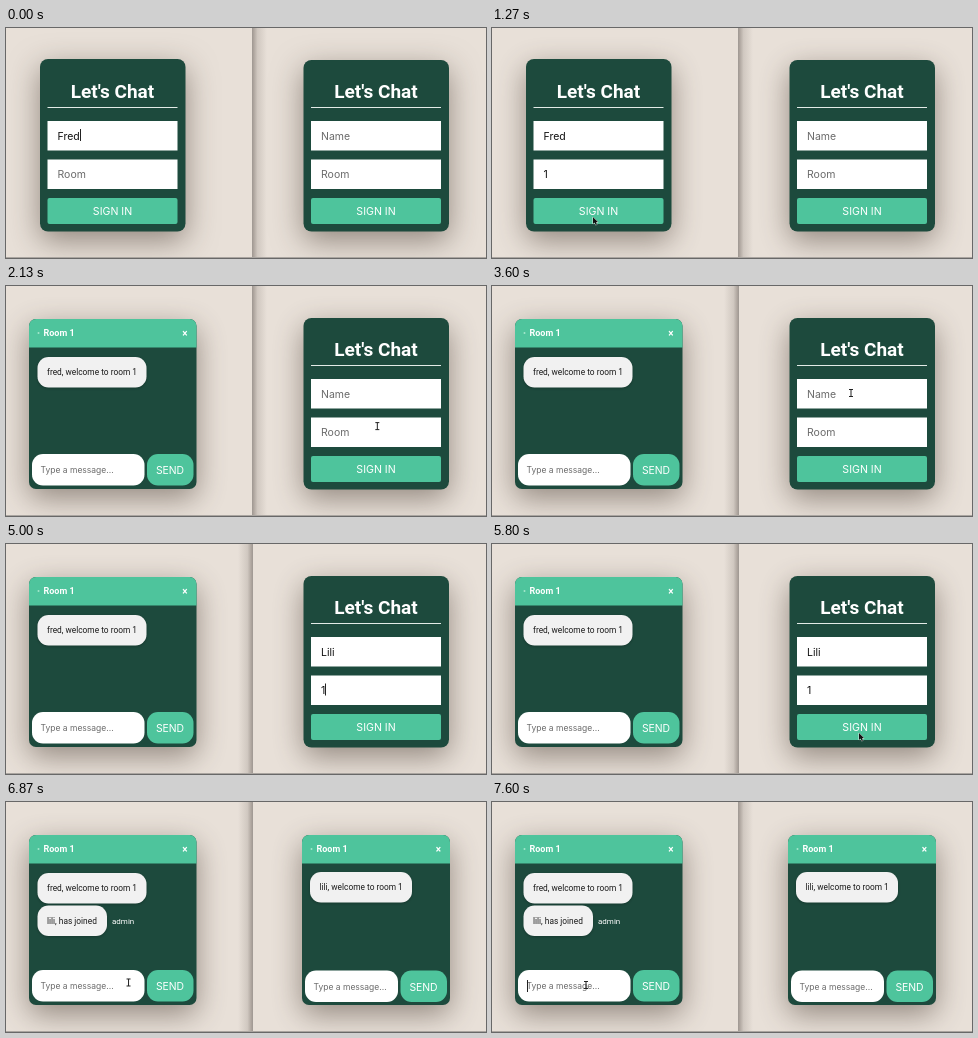
An HTML page with a canvas for the animation above (8 s loop, 480x230 px).

```html
<!DOCTYPE html>
<html lang="en">
<head>
<meta charset="utf-8">
<title>Chat rooms</title>
<style>
  html, body { margin: 0; width: 100%; height: 100%; overflow: hidden; background: #e8e0d8; }
  canvas { display: block; }
</style>
</head>
<body>
<canvas id="stage" width="480" height="230"></canvas>
<script>
const ctx = document.getElementById('stage').getContext('2d');
const LOOP = 8000, TICK = 1000 / 15;
const DARK = '#1d4a3d', MINT = '#4ec49c', CREAM = '#e8e0d8', GREY = '#6b6b6b';
const UI = 'Inter, sans-serif', ROBOTO = 'Roboto, sans-serif';

// Pointer stops: time, x, y. It moves straight between neighbours.
const visits = [
  [[720, 114, 168], [860, 114, 168], [1200, 101, 190], [1867, 101, 190], [1933, 135, 185],
   [2000, 240, 165], [2067, 372, 140], [2133, 344, 134], [2867, 344, 134], [3067, 359, 107], [3790, 359, 107]],
  [[5120, 363, 166], [5200, 363, 166], [5470, 367, 190], [6200, 367, 190], [6533, 146, 178],
   [6667, 146, 178], [7067, 99, 183], [7467, 99, 183], [7533, 94, 183], [LOOP, 94, 183]],
];

function box(x, y, w, h, r, fill) {
  ctx.fillStyle = fill;
  ctx.beginPath();
  ctx.roundRect(x, y, w, h, r);
  ctx.fill();
}

function text(str, x, y, font, fill, align = 'left') {
  ctx.font = font;
  ctx.fillStyle = fill;
  ctx.textAlign = align;
  ctx.fillText(str, x, y);
}

function shadowed(color, blur, dy, draw) {
  ctx.save();
  ctx.shadowColor = color;
  ctx.shadowBlur = blur;
  ctx.shadowOffsetY = dy;
  draw();
  ctx.restore();
}

const card = (x, y, w, h, r) =>
  shadowed('rgba(60,45,35,.5)', 30, 9, () => box(x, y, w, h, r, DARK));

function caret(x, y) {
  ctx.fillStyle = '#222';
  ctx.fillRect(Math.round(x), y, 1, 12);
}

function field(x, y, value, hint, focused) {
  box(x, y, 130, 29.5, 0, '#fff');
  text(value || hint, x + 10, y + 18.5, '10.5px ' + UI, value ? '#111' : GREY);
  if (focused) caret(x + 10 + (value ? ctx.measureText(value).width : 0), y + 8);
}

function login(x, top, name, room, focus) {
  card(x, top, 145.5, 203.5 - top, 8);
  const left = x + 7.5, mid = left + 65;
  text("Let's Chat", mid, 70, 'bold 19px ' + ROBOTO, '#fff', 'center');
  box(left, 79, 130, 1, 0, '#e3ebe7');
  field(left, 93, name, 'Name', focus === 'name');
  field(left, 131.5, room, 'Room', focus === 'room');
  box(left, 170, 130, 26, 2, MINT);
  text('SIGN IN', mid, 187, '10.6px ' + UI, '#fff', 'center');
}

function bubble(x, y, w, str) {
  shadowed('rgba(0,0,0,.25)', 3, 1, () => box(x, y, w, 30.5, 11, '#f1f1f1'));
  text(str, x + 9.5, y + 18, '8.35px ' + ROBOTO, '#1a1a1a');
}

function chat(x, w, inputTop, focused) {
  card(x, 33, w, 170, 7);
  box(x, 33, w, 28.5, [7, 7, 0, 0], MINT);
  box(x + 8.5, 46, 2, 2, 1, '#a4e6cc');
  text('Room 1', x + 14.5, 50.3, 'bold 9px ' + ROBOTO, '#fff');
  text('×', x + w - 11.5, 50.8, 'bold 10px ' + ROBOTO, '#fff', 'center');
  const sendX = x + w - 49.5;
  box(x + 3, inputTop, w - 55, 31.5, 11, '#fff');
  text('Type a message...', x + 11.5, inputTop + 19, '8.5px ' + UI, GREY);
  if (focused) caret(x + 12, inputTop + 10);
  box(sendX, inputTop, 46.5, 31.5, 11, MINT);
  text('SEND', sendX + 23, inputTop + 20, '10.4px ' + UI, '#fff', 'center');
}

function pane(x, w, draw) {
  ctx.save();
  ctx.beginPath();
  ctx.rect(x, 0, w, 230);
  ctx.clip();
  draw();
  ctx.restore();
}

// The front window throws its shadow over the other one.
function seam(rightInFront) {
  const far = rightInFront ? 232 : 261;
  const g = ctx.createLinearGradient(246.5, 0, far, 0);
  g.addColorStop(0, 'rgba(50,40,35,.38)');
  g.addColorStop(.35, 'rgba(50,40,35,.13)');
  g.addColorStop(1, 'rgba(50,40,35,0)');
  ctx.fillStyle = g;
  ctx.fillRect(Math.min(far, 246.5), 0, 14.5, 230);
  box(246, 0, 1, 230, 0, '#a29b95');
  box(0, 229, 480, 1, 0, '#aaa5a0');
}

function pointerAt(t) {
  for (const stops of visits) {
    const i = stops.findIndex(s => s[0] > t);
    if (i < 1) continue;
    const [t0, x0, y0] = stops[i - 1], [t1, x1, y1] = stops[i];
    const k = (t - t0) / (t1 - t0);
    return [x0 + (x1 - x0) * k, y0 + (y1 - y0) * k];
  }
}

function pointer([x, y], inputs) {
  const inText = inputs.some(([l, top, w, h]) => x > l && x < l + w && y > top + 4 && y < top + h);
  ctx.save();
  ctx.translate(x, y);
  ctx.beginPath();
  if (inText) {
    ctx.strokeStyle = '#222';
    ctx.lineWidth = 1;
    ctx.moveTo(-2, -3.5); ctx.lineTo(2, -3.5);
    ctx.moveTo(0, -3.5); ctx.lineTo(0, 3.5);
    ctx.moveTo(-2, 3.5); ctx.lineTo(2, 3.5);
    ctx.stroke();
  } else {
    ctx.moveTo(0, -1);
    for (const [px, py] of [[0, 6], [1.6, 4.6], [2.7, 7], [4, 6.4], [3, 4.2], [5, 4.1]]) ctx.lineTo(px, py);
    ctx.closePath();
    ctx.strokeStyle = 'rgba(255,255,255,.8)';
    ctx.lineWidth = 1;
    ctx.stroke();
    ctx.fillStyle = '#111';
    ctx.fill();
  }
  ctx.restore();
}

const loginInputs = x => [[x, 93, 130, 29], [x, 131.5, 130, 29]];

function draw(t) {
  const leftIn = t >= 1460, rightIn = t >= 5920;
  box(0, 0, 480, 230, 0, CREAM);

  pane(0, 246, () => {
    if (!leftIn) {
      const focus = t < 60 ? 'name' : t < 860 ? 'room' : '';
      login(34, 31, 'Fred', t >= 590 ? '1' : '', focus);
      return;
    }
    chat(23, 167.5, 168, t >= 7590);
    bubble(31.5, 71, 109, 'fred, welcome to room 1');
    if (t >= 5990) {
      bubble(31.5, 103.5, 69.5, 'lili, has joined');
      text('admin', 106, 121.7, '8px ' + ROBOTO, '#fff');
    }
  });

  pane(246, 234, () => {
    if (!rightIn) {
      const typed = [3790, 3990, 4120, 4260].filter(key => t >= key).length;
      const focus = t < 3720 ? '' : t < 4460 ? 'name' : t < 5120 ? 'room' : '';
      login(297.5, 32, 'Lili'.slice(0, typed), t >= 4990 ? '1' : '', focus);
      return;
    }
    chat(296, 148, 168.5, false);
    bubble(304, 70, 102, 'lili, welcome to room 1');
  });

  seam(t >= 2390 && t < 6990);

  const at = pointerAt(t);
  if (at) pointer(at, [
    ...(leftIn ? [[26, 168, 113, 31]] : loginInputs(41.5)),
    ...(rightIn ? [[299, 168, 95, 32]] : loginInputs(305)),
  ]);
}

function frame(now) {
  const t = now % LOOP;
  draw(Math.floor(t / TICK + .01) * TICK);
  requestAnimationFrame(frame);
}
requestAnimationFrame(frame);
</script>
</body>
</html>
```
